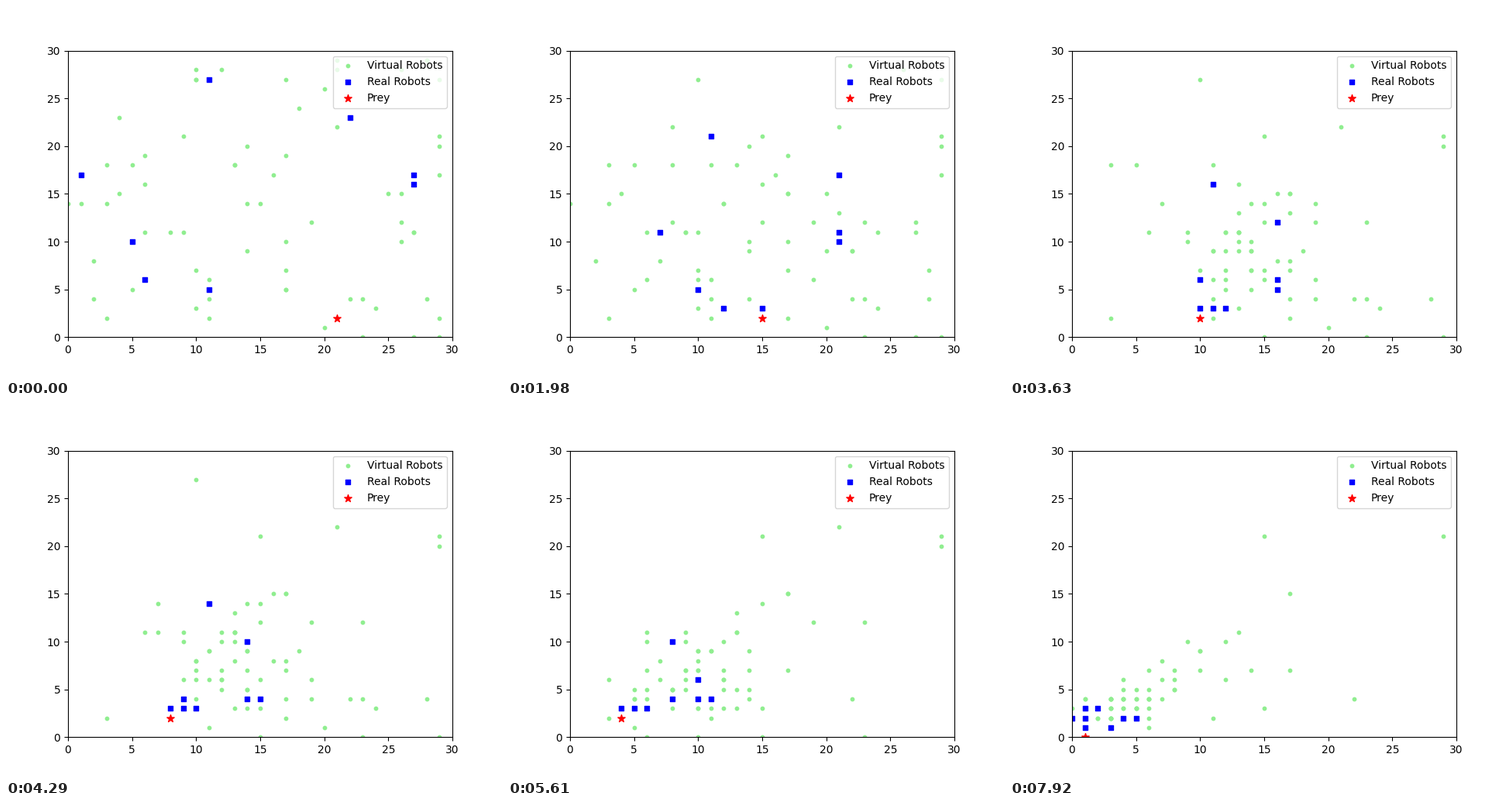
Animation of 640 by 480 pixels, one loop 8 s. Source, as a matplotlib script:

```python
import math

import numpy as np
import matplotlib.pyplot as plt
from matplotlib.animation import FuncAnimation

TICK = 40          # ms per drawn frame
FRAMES = 200
HOLD = 330         # ms per simulation step
STEPS = 25
SIZE = 30          # cells per side
EARLY = 40         # virtual robots that set off first

REAL_START = [(11, 27), (22, 23), (27, 17), (27, 16), (1, 17), (5, 10), (6, 6), (11, 5)]

# Virtual robots that wait longest, in the order they set off
LINGERING = [
    (9, 11), (17, 10), (17, 7), (29, 17), (5, 5), (27, 11), (27, 0), (10, 3),
    (11, 2), (3, 18), (5, 18), (11, 4), (28, 4), (20, 1), (14, 9), (23, 4),
    (29, 0), (24, 3), (10, 27), (19, 12), (21, 22), (23, 0), (6, 11), (29, 20),
    (3, 2), (22, 4), (10, 7), (29, 21),
]


def prey_path():
    """Runs left along one row, then slips around the corner."""
    return [(21 - s, 2) for s in range(22)] + [(0, 1), (1, 1), (1, 0)]


def chase(pos, goal):
    """Neighbouring cell in whichever of eight directions points best at the goal."""
    (x, y), (gx, gy) = pos, goal
    turn = round(math.atan2(gy - y, gx - x) / (math.pi / 4)) * math.pi / 4
    return x + round(math.cos(turn)), max(y + round(math.sin(turn)), gy + 1)


def real_paths(prey):
    """Every real robot chases the prey unless another one is in the way."""
    now = list(REAL_START)
    paths = [list(now)]
    for goal in prey[1:]:
        for k, pos in enumerate(now):
            cell = chase(pos, goal)
            if cell not in now:
                now[k] = cell
        paths.append(list(now))
    return np.array(paths)


def virtual_paths(reals):
    """Each virtual robot waits, then jumps into the swarm of real ones."""
    rng = np.random.default_rng(4)
    cells = np.vstack([rng.integers(0, SIZE, (EARLY, 2)), LINGERING])
    n = len(cells)
    leave = np.ceil(13 * np.arctanh((np.arange(n) + 0.5) / n))
    paths = [cells.copy()]
    for step in range(1, STEPS):
        go = leave == step
        count = go.sum()
        swarm = reals[step]
        spots = rng.normal(swarm.mean(axis=0), 0.8 * swarm.std(axis=0), (count, 2))
        cells[go] = np.clip(np.rint(spots), 0, SIZE - 1)
        leave[go] = step + np.ceil(2.5 * (1 - rng.random(count)) ** -0.8)
        paths.append(cells.copy())
    return paths


prey_cells = prey_path()
real_cells = real_paths(prey_cells)
virtual_cells = virtual_paths(real_cells)

fig, ax = plt.subplots(figsize=(6.4, 4.8), dpi=100)
ax.set_xlim(0, SIZE)
ax.set_ylim(0, SIZE)
virtual = ax.scatter([], [], s=10, c="lightgreen", marker="o", label="Virtual Robots")
real = ax.scatter([], [], s=20, c="blue", marker="s", label="Real Robots")
prey = ax.scatter([], [], s=50, c="red", marker="*", label="Prey")
ax.legend(loc="upper right")


def update(i):
    step = min(((i + 1) * TICK - 1) // HOLD, STEPS - 1)
    virtual.set_offsets(virtual_cells[step])
    real.set_offsets(real_cells[step])
    prey.set_offsets([prey_cells[step]])
    return virtual, real, prey


anim = FuncAnimation(fig, update, frames=FRAMES, interval=TICK,
                     repeat=True, repeat_delay=0, blit=False)
plt.show()
```
